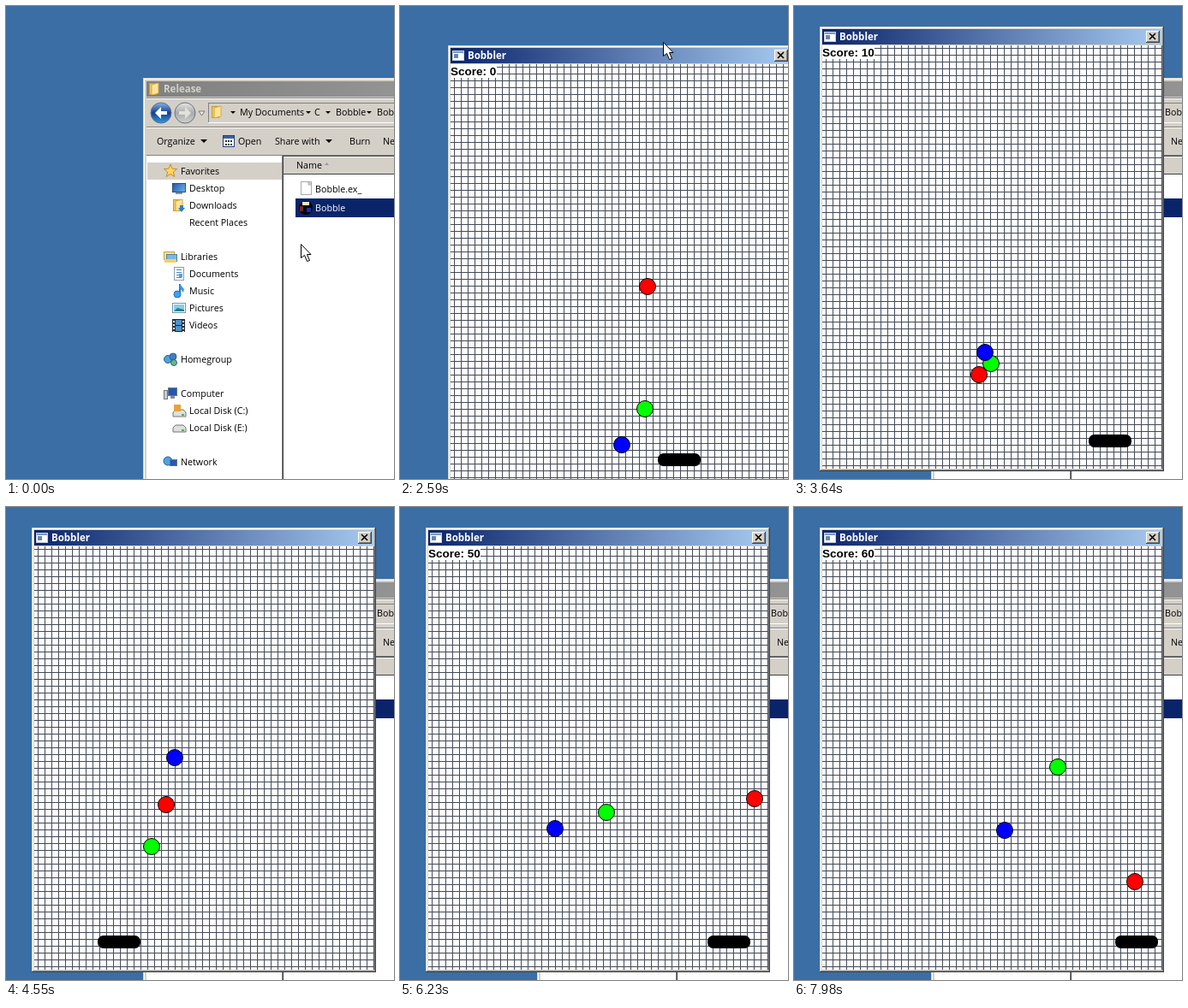
An HTML page with a canvas for the animation above (8000 ms loop, 453x553 px).

```html
<!DOCTYPE html>
<html lang="en">
<head>
<meta charset="utf-8">
<title>Ball game</title>
<style>
html, body { margin: 0; width: 100%; height: 100%; overflow: hidden; background: #3a6ea5; }
canvas { display: block; }
</style>
</head>
<body>
<canvas id="stage" width="453" height="553"></canvas>
<script>
const ctx = document.getElementById('stage').getContext('2d');
const LOOP = 8000, TICK = 70, GRAVITY = 211;
const OPEN = 1.12, GRAB = 2.8, DROP = 3.2;
const FACE = '#d4d0c8', NAVY = '#0a246a', SHADOW = '#808080', DARK = '#404040';
const UI = '10.7px "Open Sans", sans-serif';
const BOLD = 'bold 11.5px "Open Sans", sans-serif';

// Turning points [game seconds, x, y] in the client area; gravity bends the path between them.
const balls = [
  { color: '#f00', hits: [[1.6, 200, 446], [2.8, 236, 248], [3.4, 164, 446], [5.5, 136, 345],
    [5.82, 387, 297], [6.483, 10, 265], [7.6, 371, 398]] },
  { color: '#0f0', hits: [[2.43, 200, 446], [2.8, 263, 356], [3.76, 120, 446], [6.47, 235, 454], [9.22, 333, 446]] },
  { color: '#00f', hits: [[2.9, 200, 446], [4.15, 164, 248], [5.29, 127, 455], [6.46, 173, 264], [8.07, 231, 446]] }
];
const catches = [[1.55, 311], [1.89, 267], [3, 267], [3.31, 346], [3.76, 120], [4.15, 99], [5.2, 127],
  [5.4, 127], [5.9, 364], [6.46, 233], [7.44, 312], [7.58, 367]];
const drag = [[GRAB, 56, 46], [3.01, 38, 32], [3.15, 30, 24]];
const approach = [[0.42, 344, 278], [0.7, 370, 240]];
const reach = [[1.89, 316, 70], [2.1, 304, 24], [GRAB, 308, 50]];

const linear = p => p;
const smooth = p => p * p * (3 - 2 * p);

// The game stands still while its window is dragged.
const gameClock = t => t < GRAB ? t : Math.max(GRAB, t - (DROP - GRAB));

function along(keys, t, ease = linear, gravity = 0) {
  const last = keys.length - 1;
  if (t <= keys[0][0]) return keys[0].slice(1);
  if (t >= keys[last][0]) return keys[last].slice(1);
  const i = keys.findIndex(k => k[0] > t);
  const a = keys[i - 1], b = keys[i], span = b[0] - a[0], s = t - a[0];
  const p = a.slice(1).map((v, n) => v + (b[n + 1] - v) * ease(s / span));
  if (gravity) p[1] -= gravity / 2 * s * (span - s);
  return p.map(Math.round);
}

function rect(x, y, w, h, color) {
  ctx.fillStyle = color;
  ctx.fillRect(x, y, w, h);
}
function text(s, x, y, color = '#000', font = UI) {
  ctx.font = font;
  ctx.fillStyle = color;
  ctx.fillText(s, x, y);
}
function paint(fill, stroke) {
  ctx.fillStyle = fill;
  ctx.fill();
  if (stroke) { ctx.strokeStyle = stroke; ctx.lineWidth = 1; ctx.stroke(); }
}
function circle(x, y, r, fill, stroke) {
  ctx.beginPath();
  ctx.arc(x, y, r, 0, Math.PI * 2);
  paint(fill, stroke);
}
function poly(points, fill, stroke) {
  ctx.beginPath();
  points.forEach(([x, y]) => ctx.lineTo(x, y));
  ctx.closePath();
  paint(fill, stroke);
}
function framed(x, y, w, h, fill, edge) {
  rect(x, y, w, h, edge);
  rect(x + 1, y + 1, w - 2, h - 2, fill);
}
// Nested edges, each one pixel inside the last; colours alternate bottom-right, top-left.
function bevel(x, y, w, h, ...colors) {
  colors.forEach((c, i) => {
    const inset = Math.floor(i / 2), trim = Math.ceil(i / 2) + inset;
    rect(x + inset, y + inset, w - trim, h - trim, c);
  });
}
function gradient(x0, y0, x1, y1, ...colors) {
  const g = ctx.createLinearGradient(x0, y0, x1, y1);
  colors.forEach((c, i) => g.addColorStop(i / (colors.length - 1), c));
  return g;
}
function groove(y) {
  rect(164, y, 289, 1, SHADOW);
  rect(164, y + 1, 289, 1, '#fff');
}
const downArrow = (x, y, w = 3) => poly([[x - w, y], [x + w, y], [x, y + w]], '#000');

const icons = {
  star(x, y) {
    const pts = Array.from({ length: 10 }, (_, i) => {
      const a = -Math.PI / 2 + i * Math.PI / 5, r = i % 2 ? 3.5 : 8;
      return [x + r * Math.cos(a), y + r * Math.sin(a)];
    });
    poly(pts, '#ffd75a', '#c98a2b');
  },
  folder(x, y) {
    framed(x - 7, y - 7, 9, 14, '#f3c75c', '#c99a35');
    poly([[x - 4, y - 5], [x + 4, y - 7], [x + 4, y + 5], [x - 4, y + 7]], '#ffe59a', '#d3a743');
  },
  downloads(x, y) {
    icons.folder(x, y);
    rect(x + 1, y, 4, 4, '#2d7fd0');
    poly([[x - 1, y + 3], [x + 7, y + 3], [x + 3, y + 8]], '#2d7fd0');
  },
  screen(x, y) {
    framed(x - 8, y - 6, 16, 11, gradient(x - 8, y - 6, x + 8, y + 5, '#1b54aa', '#71b8ee'), '#314d70');
    rect(x - 4, y + 5, 8, 2, '#8194a8');
  },
  libraries(x, y) {
    framed(x - 8, y - 6, 13, 10, '#ffe28c', '#cf9e38');
    framed(x - 5, y - 3, 13, 9, '#78b9e3', '#4b83ad');
    rect(x - 7, y + 3, 14, 4, '#f5cf68');
  },
  document(x, y) {
    framed(x - 6, y - 8, 12, 16, '#fff', '#8aa0b5');
    for (let i = 0; i < 4; i++) rect(x - 3, y - 5 + i * 3, 6, 1, '#4d86bc');
    rect(x, y, 4, 4, '#5aa0d5');
  },
  note(x, y) {
    rect(x, y - 8, 2, 13, '#1972c8');
    poly([[x + 1, y - 8], [x + 6, y - 2], [x + 5, y + 2], [x + 1, y - 3]], '#3c9ae8');
    circle(x - 2, y + 4, 4, '#42a0ed', '#1972c8');
  },
  picture(x, y) {
    framed(x - 8, y - 6, 16, 12, '#fff', '#7894a8');
    rect(x - 6, y - 4, 12, 8, '#87ccef');
    poly([[x - 6, y + 4], [x - 2, y], [x + 6, y + 2], [x + 6, y + 4]], '#268086');
  },
  film(x, y) {
    framed(x - 8, y - 7, 15, 15, '#4d92cc', '#222');
    for (const dx of [-8, 3]) {
      rect(x + dx, y - 7, 4, 15, '#24303c');
      for (let i = 0; i < 4; i++) rect(x + dx + 1, y - 5 + i * 4, 2, 2, '#eee');
    }
    rect(x - 4, y, 7, 1, '#222');
  },
  group(x, y) {
    circle(x - 3, y, 4.5, '#4da3d9', '#28618b');
    circle(x + 3, y - 3, 4, '#3f7fc0', '#28618b');
    circle(x + 4, y + 4, 3.5, '#68bd77', '#28618b');
  },
  computer(x, y) {
    framed(x - 8, y - 4, 5, 11, '#c6cdd4', '#697785');
    framed(x - 3, y - 7, 11, 10, '#2456b0', '#697785');
    rect(x, y + 3, 5, 3, '#889');
  },
  disk(x, y) {
    poly([[x - 7, y], [x - 4, y - 3], [x + 5, y - 3], [x + 8, y], [x + 8, y + 5], [x - 7, y + 5]], '#dde0df', '#777');
    rect(x + 3, y + 2, 3, 2, '#49b64d');
  },
  systemDisk(x, y) {
    icons.disk(x, y + 2);
    rect(x - 6, y - 7, 8, 8, '#e5a33b');
  },
  network(x, y) {
    circle(x - 3, y - 1, 5, '#4fa3df', '#275e9d');
    framed(x - 1, y - 3, 9, 8, '#2558b8', '#62758a');
  }
};

// Each group starts with its heading; a blank row follows it.
const groups = [
  [['Favorites', 'star'], ['Desktop', 'screen'], ['Downloads', 'downloads'], ['Recent Places']],
  [['Libraries', 'libraries'], ['Documents', 'document'], ['Music', 'note'], ['Pictures', 'picture'], ['Videos', 'film']],
  [['Homegroup', 'group']],
  [['Computer', 'computer'], ['Local Disk (C:)', 'systemDisk'], ['Local Disk (E:)', 'disk']],
  [['Network', 'network']]
];

function drawTree() {
  rect(164, 175, 158, 378, '#fff');
  rect(165, 183, 157, 20, FACE);
  let y = 193;
  for (const group of groups) {
    group.forEach(([label, icon], i) => {
      const indent = i ? 10 : 0;
      if (icon) icons[icon](192 + indent, y);
      text(label, 204 + indent, y + 4);
      y += 20;
    });
    y += 20;
  }
}

function drawFiles() {
  rect(324, 176, 129, 377, '#fff');
  rect(322, 175, 1, 378, SHADOW);
  rect(323, 175, 1, 378, DARK);
  rect(322, 174, 131, 1, SHADOW);
  rect(323, 175, 130, 1, DARK);
  rect(324, 177, 129, 19, FACE);
  rect(324, 196, 129, 1, DARK);
  text('Name', 339, 190);
  poly([[372, 186], [377, 186], [374.5, 183]], '#999');
  framed(344, 205, 13, 16, '#fff', '#aaa');
  poly([[353, 205], [357, 209], [353, 209]], '#ddd', '#aaa');
  text('Bobble.ex_', 361, 218);
  rect(338, 225, 115, 22, NAVY);
  circle(350, 236, 8, '#050510');
  rect(346, 229, 8, 4, '#f5e9bd');
  rect(343, 234, 4, 6, '#77271e');
  rect(351, 236, 5, 5, '#1931a5');
  text('Bobble', 361, 240, '#fff');
}

function drawNavButton(x, dir, fill, arrow) {
  circle(x, 125, 12, fill, '#66758a');
  const tip = [[-7, 0], [0, -7], [0, -2], [7, -2], [7, 2], [0, 2], [0, 7]];
  poly(tip.map(([dx, dy]) => [x + dx * dir, 125 + dy]), arrow);
}

function drawExplorer() {
  rect(160, 84, 293, 469, FACE);
  rect(161, 85, 292, 1, '#fff');
  rect(161, 85, 1, 468, '#fff');
  rect(164, 88, 289, 18, gradient(164, 0, 1000, 0, SHADOW, '#b8b8b8'));
  icons.folder(174, 97);
  text('Release', 184, 101, FACE, BOLD);

  groove(107);
  drawNavButton(181, 1, gradient(0, 113, 0, 137, '#7fb4e4', '#173e92', '#2d9be0'), '#fff');
  drawNavButton(209, -1, gradient(0, 113, 0, 137, '#e5e5e3', '#aaa', '#d0d0ce'), '#e0e0dd');
  poly([[225, 123], [232, 123], [228.5, 128]], '#eee', '#777');
  rect(236, 113, 217, 1, SHADOW);
  rect(236, 113, 1, 23, SHADOW);
  rect(236, 136, 217, 1, '#fff');
  icons.folder(247, 124);
  [265, 353, 376, 424].forEach(x => downArrow(x, 123));
  text('My Documents', 273, 128);
  text('C', 360, 128);
  text('Bobble', 385, 128);
  text('Bobble', 433, 128);

  groove(141);
  text('Organize', 176, 162);
  downArrow(231, 156, 4);
  framed(253, 151, 14, 14, '#fff', '#263d72');
  rect(254, 152, 12, 3, '#3762a5');
  for (let i = 0; i < 6; i++) rect(256 + i % 3 * 3, 157 + (i / 3 | 0) * 4, 2, 2, '#333');
  text('Open', 271, 162);
  text('Share with', 314, 162);
  downArrow(377, 156, 4);
  text('Burn', 401, 162);
  text('New folder', 440, 162);
  rect(164, 174, 158, 1, SHADOW);
  drawTree();
  drawFiles();
}

function drawFrame() {
  bevel(0, 0, 402, 520, DARK, FACE, SHADOW, '#fff', FACE);
  rect(3, 3, 396, 18, gradient(3, 0, 399, 0, NAVY, '#a6caf0'));
  framed(5, 6, 14, 12, '#fff', '#c8d0dc');
  rect(6, 7, 12, 2, '#789cca');
  rect(7, 10, 5, 5, '#6989ad');
  text('Bobbler', 23, 16, '#fff', BOLD);

  bevel(381, 5, 16, 14, DARK, '#fff', SHADOW, FACE);
  ctx.strokeStyle = '#000';
  ctx.lineWidth = 1.6;
  ctx.beginPath();
  ctx.moveTo(385, 8); ctx.lineTo(392, 15);
  ctx.moveTo(392, 8); ctx.lineTo(385, 15);
  ctx.stroke();
}

function drawGrid(w, h) {
  rect(0, 0, w, h, '#fff');
  for (let x = 4; x < w; x += 8) rect(x, 0, 1, h, '#444a58');
  for (let y = 3; y < h; y += 8) rect(0, y, w, 1, '#444a58');
}

// Every hit in the lower half since the drag is worth ten points.
function scoreAt(clock) {
  const hits = balls.flatMap(b => b.hits);
  return 10 * hits.filter(([t, , y]) => t > GRAB && t < clock && y > 340).length;
}

function drawScore(clock) {
  const font = 'bold 13.5px "Liberation Sans", Arial, sans-serif';
  const label = 'Score: ' + scoreAt(clock);
  ctx.font = font;
  rect(0, 0, Math.ceil(ctx.measureText(label).width), 16, '#fff');
  text(label, 0, 13, '#000', font);
}

function drawGame(t, tick) {
  const clock = gameClock(t);
  ctx.save();
  ctx.translate(...along(drag, t));
  drawFrame();
  ctx.translate(3, 22);
  drawGrid(397, 495);
  // The score blinks as the window repaints.
  if (tick % 9 !== 2) drawScore(clock);

  const [px] = along(catches, clock, smooth);
  ctx.beginPath();
  ctx.roundRect(px - 25, 455, 50, 15, 6.5);
  paint('#000');
  for (const { color, hits } of balls) {
    const [x, y] = along(hits, clock, linear, GRAVITY);
    circle(x, y - 1, 9.5, color, '#000');
  }
  ctx.restore();
}

function cursorAt(t) {
  if (t < OPEN) return along(approach, t);
  if (t < GRAB) return along(reach, t);
  const [x, y] = along(drag, t);
  return [x + 252, y + 4 + Math.max(0, t - DROP) * 150];
}

function drawCursor(t) {
  // Hidden while it is inside the game area.
  if (t >= OPEN && t < 1.95 || t > DROP + 0.14) return;
  const [x, y] = cursorAt(t);
  const shape = [[0, 0], [0, 16], [4, 13], [7, 20], [10, 19], [7, 12], [11.5, 12]];
  poly(shape.map(([a, b]) => [x + a + 0.5, y + b + 0.5]), '#fff', '#000');
}

function draw(ms) {
  const tick = Math.floor(ms % LOOP / TICK);
  const t = tick * TICK / 1000;
  rect(0, 0, 453, 553, '#3a6ea5');
  drawExplorer();
  if (t >= OPEN) drawGame(t, tick);
  drawCursor(t);
}

let start;
function frame(now) {
  start ??= now;
  draw(Math.max(0, now - start));
  requestAnimationFrame(frame);
}
draw(0);
requestAnimationFrame(frame);
</script>
</body>
</html>
```
